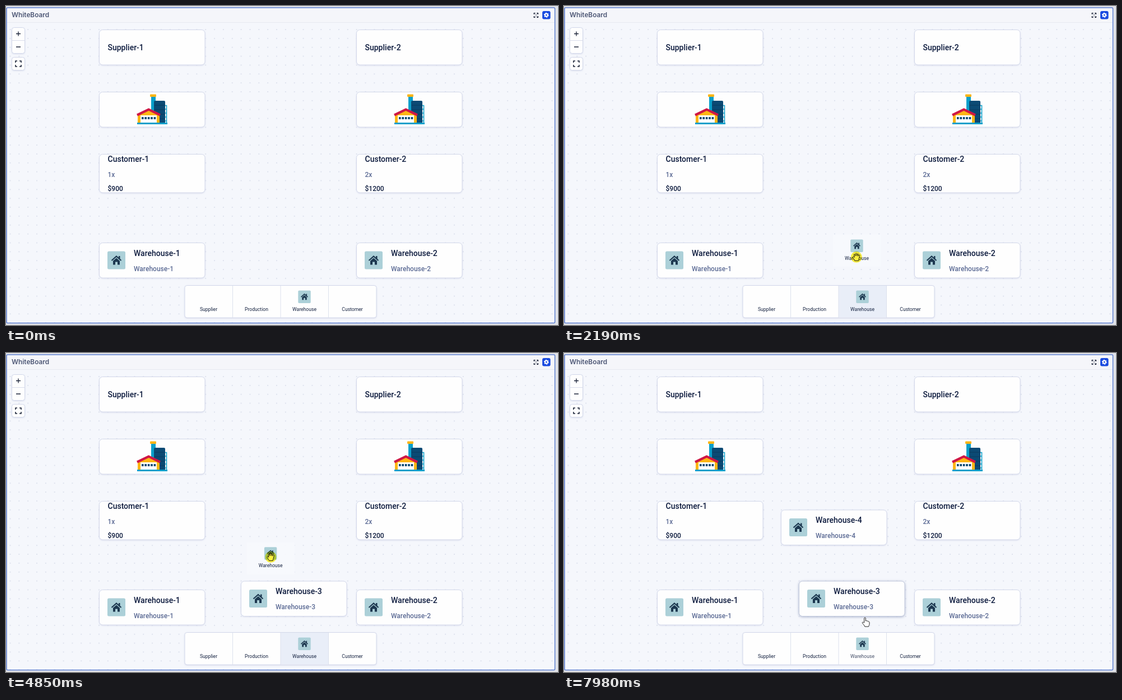
Recreate the animation shown at these times as an HTML page. Size 985 by 569 pixels, loop 8 s.

```html
<!DOCTYPE html>
<html lang="en">
<head>
<meta charset="utf-8">
<title>WhiteBoard</title>
<style>
html, body { margin: 0; height: 100%; overflow: hidden; background: #e1e3e9; }
svg { display: block; font-family: Roboto, sans-serif; }
.card, .tool { fill: #fefefe; stroke: #d3d8ea; filter: drop-shadow(0 1px 1px #c9cfe499); }
.hot .card { stroke: #c3cadd; filter: drop-shadow(0 1px 2px #a9b2cc); }
.title { font-size: 14px; font-weight: 500; fill: #0d1b3e; }
.sub { font-size: 12px; font-weight: 500; fill: #5c6b95; }
.price { font-size: 12px; font-weight: 500; fill: #0d1b3e; }
.label { font-size: 8.6px; fill: #14213f; text-anchor: middle; }
.icon { fill: none; stroke: #1b2338; stroke-width: 1.3; }
.cursor { fill: #fff; stroke: #222; stroke-width: 1; stroke-linejoin: round; }
#halo { fill: #fbf03f; mix-blend-mode: multiply; }
</style>
</head>
<body>
<svg width="985" height="569" viewBox="0 0 985 569">
  <defs>
    <pattern id="dots" x="-.4" y="2.4" width="15.85" height="15.85" patternUnits="userSpaceOnUse">
      <circle cx="7.9" cy="7.9" r=".9" fill="#d3d8e7"/>
    </pattern>
    <g id="house">
      <rect x="-16" y="-16" width="32" height="32" rx="2.5" fill="#acd0d8"/>
      <path d="M-8.5 .5L0-7 8.5 .5" fill="none" stroke="#1d3850" stroke-width="2.2"/>
      <path d="M4-7.5H6.5V-2L4-4ZM-6 1.2L0-4 6 1.2V8H2V3H-2V8H-6Z" fill="#1d3850"/>
    </g>
    <g id="factory">
      <path d="M93 9H101V58H93Z" fill="#0a9fca"/>
      <rect x="91" y="4.5" width="11" height="4.5" rx="1" fill="#fdb515"/>
      <path d="M117 24.500H120.500V57M117 31H120.500M117 38H120.500M117 45H120.500M117 52H120.500" fill="none" stroke="#0a9fca" stroke-width="1.5"/>
      <path d="M98 18Q98 16 100 16H116Q118 16 118 18V58H98Z" fill="#0b4a74"/>
      <path d="M99 24H117M99 32H117M99 40H117M99 48H117" stroke="#083a5f"/>
      <path d="M69 42L88 31 108 42V58H69Z" fill="#fdb515"/>
      <path d="M68 41.500L88.500 31.500 109 41.500" fill="none" stroke="#cf1745" stroke-width="4.200"/>
      <path d="M74 42H103V55H74Z" fill="#fff"/>
      <path d="M76 47H102" stroke="#0b4a74" stroke-width="4" stroke-dasharray="3.600 1.800"/>
      <path d="M68 56.500H122" stroke="#0a9fca" stroke-width="3"/>
    </g>
  </defs>

  <rect x="1" y="3" width="978.500" height="562.500" rx="2" fill="#f5f7fc"/>
  <rect x="2" y="30" width="977" height="535" fill="url(#dots)"/>
  <path d="M2 4H979V29.500H2Z" fill="#f5f6fa"/>
  <path d="M2 29.500H979" stroke="#e6e9f1"/>
  <rect x="1" y="3" width="978.500" height="562.500" rx="2" fill="none" stroke="#5d7fd0" stroke-width="1.500"/>
  <text x="10" y="20" style="font:600 11.800px Inter, sans-serif" fill="#4d5775">WhiteBoard</text>
  <path class="icon" d="M942 15V12.500H944.500M942 12.500L945 15.500M947 12.500H949.500V15M949.500 12.500L946.500 15.500M942 18V20.500H944.500M942 20.500L945 17.500M949.500 18V20.500H947M949.500 20.500L946.500 17.500" style="stroke-width:1"/>
  <rect x="957" y="9" width="14.500" height="14.500" rx="3" fill="#1a4be0"/>
  <circle cx="964.200" cy="16.200" r="3.700" fill="none" stroke="#fff" stroke-width="1.500" stroke-dasharray="1.940 1.940"/>
  <circle cx="964.200" cy="16.200" r="2.400" fill="none" stroke="#fff" stroke-width="2"/>

  <rect class="tool" x="10.500" y="38.500" width="23" height="46" rx="4"/>
  <path d="M11 61.500H33" stroke="#d9ddea"/>
  <rect class="tool" x="10.500" y="91.500" width="23" height="23" rx="4"/>
  <path class="icon" d="M18 49.500H26M22 45.500V53.500M18 73H26"/>
  <path class="icon" d="M17 101V98H20M24 98H27V101M27 105V108H24M20 108H17V105" style="stroke-width:1.600"/>

  <g id="cards"></g>

  <rect class="tool" x="319" y="498.500" width="342" height="57.500" rx="4"/>
  <rect id="cell" x="490" y="499" width="85.500" height="56.500" fill="#e9eef8"/>
  <path d="M404.500 499V556M490 499V556M575.500 499V556" stroke="#dce1ed"/>
  <text class="label" x="361.500" y="544">Supplier</text>
  <text class="label" x="447" y="544">Production</text>
  <text class="label" x="618" y="544">Customer</text>
  <use href="#house" transform="translate(532.500 518.700) scale(.7)"/>
  <text class="label" id="source" x="532.500" y="544">Warehouse</text>

  <g id="ghost">
    <rect x="-42.500" y="-20" width="85.500" height="57" fill="#f8f9fd" opacity=".95"/>
    <use href="#house" transform="scale(.7)"/>
    <text class="label" y="25">Warehouse</text>
  </g>
  <g id="pointer">
    <path class="cursor" id="arrow" d="M0 0V12L3 9.300 5 13.600 7 12.700 5 8.600H9Z"/>
    <path class="cursor" id="grab" d="M-3 6.500C-4 4-6 2-6.500 .5-6.500-1-5-1-3.500 .5L-4.500-4C-4.700-5.500-3-5.800-2.600-4.400L-2-2-1.600-5.600C-1.400-7 .4-7 .5-5.600L.6-2.200 1.500-5.300C2-6.500 3.500-6 3.300-4.800L2.900-1.600 4.200-3.600C5-4.600 6.300-3.800 5.900-2.700L4.400 3.500 3.700 6.500Z"/>
    <path class="cursor" id="hand" d="M-1.300 9V1.200C-1.300-.4 1.300-.4 1.300 1.200V6C2 5 3.500 5.300 3.700 6.300 4.600 5.700 6 6 6 7.200 7 6.800 8 7.300 8 8.500V11C8 13 7 14 6.500 16H-.2C-1 13.500-3.500 11.500-4.600 9.600-5.300 8.300-3.800 7.500-2.800 8.400Z"/>
  </g>
  <circle id="halo" r="10"/>
</svg>
<script>
const $ = id => document.getElementById(id);
const LOOP = 8000, LAG = 60;

const text = (kind, x, y, s) => `<text class="${kind}" x="${x}" y="${y}">${s}</text>`;
const card = (x, y, body, id = '', h = 63) =>
  `<g id="${id}" transform="translate(${x} ${y})"><rect class="card" x=".5" y=".5" width="188.500" height="${h - .5}" rx="6"/>${body}</g>`;
const warehouse = (n, x, y) => card(x, y,
  '<use href="#house" x="31" y="31.500"/>' + text('title', 62, 23.5, 'Warehouse-' + n) +
  text('sub', 62, 50.5, 'Warehouse-' + n), 'w' + n);

$('cards').innerHTML = [1, 2].map(n => {
  const x = n === 1 ? 166 : 625;
  return card(x, 42, text('title', 15.5, 36.5, 'Supplier-' + n)) +
    card(x, 153, '<use href="#factory"/>') +
    card(x, 264, text('title', 15.5, 13.5, 'Customer-' + n) + text('sub', 15.5, 40.5, n + 'x') +
      text('price', 15.5, 65.5, n === 1 ? '$900' : '$1200'), '', 69) +
    warehouse(n, x, 422);
}).join('') + warehouse(3, 419, 406.5) + warehouse(4, 387, 279.5);

// Cursor path: time, x, y
const path = [
  [520, 628, 566], [760, 570, 546], [950, 530, 538], [1090, 536, 539], [1230, 536, 539],
  [1440, 538, 540], [1520, 532.5, 526], [1580, 540.5, 511], [1800, 537, 476], [1990, 532, 454],
  [2150, 528, 448], [2430, 486, 447], [2790, 507, 448], [3560, 507, 448],
  [3800, 525, 500], [4030, 544, 538], [4170, 538, 538], [4240, 531.5, 531], [4300, 528.5, 519],
  [4600, 496, 425], [4920, 466, 347], [5200, 456, 315], [5540, 460, 311], [5940, 460, 311],
  [6370, 466, 317.5], [7150, 466, 317.5], [7500, 478, 350], [7840, 508, 421], [7980, 537, 472]
];

function cursorAt(t) {
  const i = path.findIndex(p => p[0] > t);
  if (i < 0) return path[path.length - 1].slice(1);
  if (i === 0) return path[0].slice(1);
  const [a, b] = [path[i - 1], path[i]], k = (t - a[0]) / (b[0] - a[0]);
  return [a[1] + (b[1] - a[1]) * k, a[2] + (b[2] - a[2]) * k];
}

const show = (id, on) => $(id).style.display = on ? '' : 'none';
const move = (id, x, y) => $(id).setAttribute('transform', `translate(${x} ${y})`);

function draw(t) {
  const within = (a, b) => t >= a && t < b;
  const [x, y] = cursorAt(t), [gx, gy] = cursorAt(t - LAG);
  const over = (l, top, w, h) => x >= l && x < l + w && y >= top && y < top + h;
  const dragging = within(1540, 3000) || within(4200, 7110);
  const placed3 = t >= 3070, placed4 = t >= 7110;
  const on3 = placed3 && !dragging && t >= 3220 && over(419, 406, 190, 68);
  const on4 = placed4 && over(387, 279, 190, 64);

  show('w3', placed3);
  show('w4', placed4);
  move('w3', t < 3360 ? 371 : 419, 406.5);
  $('w3').classList.toggle('hot', on3);
  $('w4').classList.toggle('hot', on4);
  show('cell', dragging || within(3000, 3070) || (t >= 520 && over(490, 499, 85, 57)));
  $('source').style.fill = placed4 ? '#465069' : '';

  show('ghost', dragging);
  move('ghost', gx - 6, gy - 21);
  show('pointer', t >= 520);
  move('pointer', x, y);
  const grabbing = (dragging && t < 7040) || over(319, 499, 342, 57);
  show('grab', grabbing);
  show('hand', !grabbing && (on3 || on4));
  show('arrow', !grabbing && !on3 && !on4);
  show('halo', within(1300, 3000) || within(4170, 7110));
  move('halo', x, y);
}

const start = performance.now();
(function tick() {
  draw((performance.now() - start) % LOOP);
  requestAnimationFrame(tick);
})();
</script>
</body>
</html>
```
